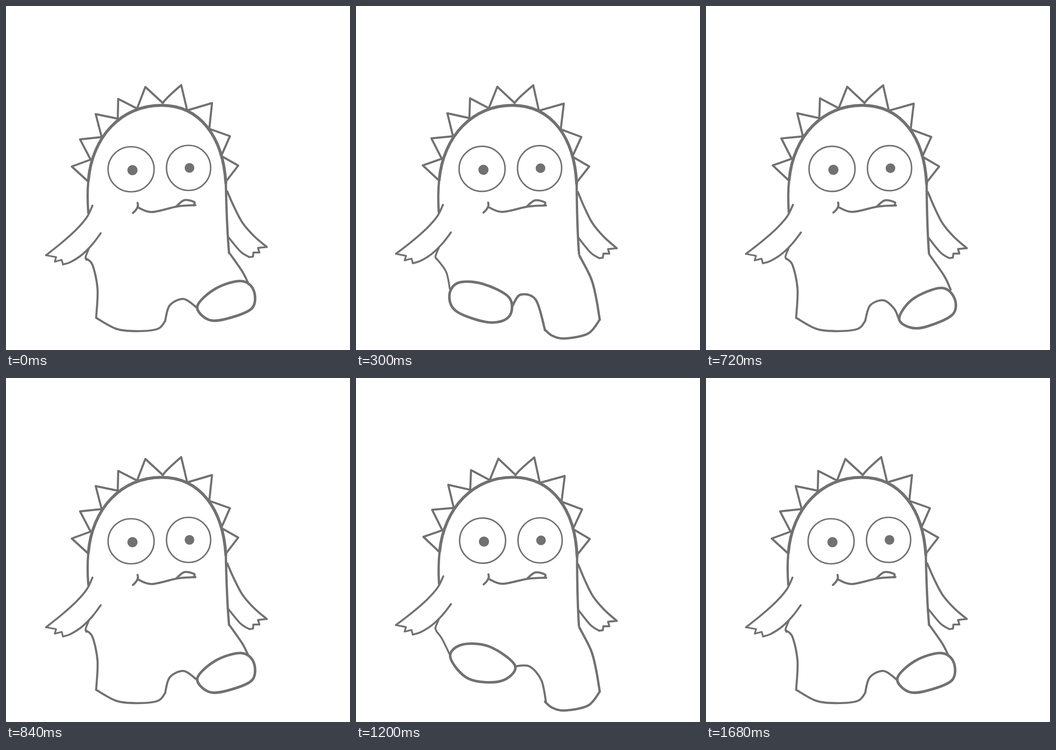
Animation, 748 px wide and 748 px high, one loop 1.8 s. Source, as an HTML page with a canvas:

```html
<!DOCTYPE html>
<html lang="en">
<head>
<meta charset="utf-8">
<title>Walking monster</title>
<style>
  html, body { margin: 0; width: 100%; height: 100%; overflow: hidden; background: #fff; }
  canvas { display: block; width: 748px; height: 748px; }
</style>
</head>
<body>
<canvas id="stage" width="748" height="748"></canvas>
<script>
const ctx = document.getElementById('stage').getContext('2d');
const SIZE = 748, INK = '#717171';
const LOOP = 1800, TICK = 60;
const TILT = 0.0187, PIVOT = [345, 530];
const THIN = 3.2, MID = 4.5, BOLD = 5.6;

const clamp = (v, lo, hi) => Math.max(lo, Math.min(hi, v));
const stroke = (d, width = MID) => ({ path: new Path2D(d), width });

// Catmull-Rom spline through a few key points
function curve(text, width = MID, closed = false) {
  const p = text.trim().split(/\s+/).map(s => s.split(',').map(Number));
  const n = p.length;
  const at = i => p[closed ? (i + n) % n : clamp(i, 0, n - 1)];
  let d = `M${p[0]}`;
  for (let i = 0; i < n - (closed ? 0 : 1); i++) {
    const [a, b, c, e] = [-1, 0, 1, 2].map(k => at(i + k));
    d += 'C' + [b.map((v, j) => v + (c[j] - a[j]) / 6),
                c.map((v, j) => v - (e[j] - b[j]) / 6), c];
  }
  return stroke(d + (closed ? 'Z' : ''), width);
}

const foot = text => curve(text, BOLD, true);

function oval(x, y, rx, ry = rx) {
  const path = new Path2D();
  path.ellipse(x, y, rx, ry, 0, 0, Math.PI * 2);
  return { path, width: THIN };
}

const spikes = stroke(`M178,381L143,349 184,334 161,290 208,285 195,235 243,245
  244,202 285,223 303,176 341,211Q347,201 381,172L394,227 448,211 442,267
  487,283 468,326 505,347 478,382`);

const body = [
  stroke('M179,450Q176,412 179,380M478,385Q480,480 485,537', 5),
  stroke('M179,380C187,285 250,216 338,216C422,216 472,285 478,385', 6.4)
];

const arms = [
  curve('188,434 176,459 153,486 122,514 87,542', 4.2),
  stroke('M87,542L109,546 106,556 121,552 124,562', 3.8),
  curve('124,562 140,557 165,541 188,518 206,494', 4.2),
  curve('180,528 173,546 175,552', 4),
  curve('481,403 496,437 514,471 539,500 567,524'),
  stroke('M567,524L548,526 551,536 538,536 537,545 529,546', 4.2),
  curve('529,546 510,534 484,503', 4.2)
];

const face = [
  oval(272, 355, 50, 49),
  oval(397, 352, 48, 49),
  stroke('M286,428Q290,438 276,450'),
  curve('287,438 317,448 372,436 412,433'),
  curve('371,435 388,422 409,426 408,433')
];

const pupils = [oval(275, 357, 11), oval(399, 352, 10.5)];
const upper = [spikes, ...body, ...arms, ...face];

const leftStand = [
  curve('174,549 188,563 199,615 196,678'),
  curve('196,678 240,702 285,707 330,702 346,685'),
];
const rightStand = [
  curve('486,543 511,592 522,634 530,682', 5),
  curve('411,704 427,717 455,723 505,712 530,682', 5)
];

// leg drawings, from right foot raised to left foot raised
const legs = [
  [
    ...leftStand,
    curve('346,685 356,651 386,637 415,656'),
    foot('416,653 455,615 510,598 538,617 535,657 480,680 440,682'),
    curve('485,536 513,576 526,601')
  ],
  [
    ...leftStand,
    curve('346,685 357,651 386,640 409,658 419,680'),
    foot('420,679 450,637 511,613 540,635 536,671 480,697 444,699'),
    curve('486,541 518,587 532,617')
  ],
  [
    curve('174,550 196,581 201,645 206,675'),
    foot('207,676 245,666 320,677 347,689 300,705 240,699'),
    curve('343,679 354,645 389,636 407,668'),
    foot('407,673 450,655 518,651 536,678 500,708 452,718 415,702'),
    curve('486,541 517,587 528,614 535,660', 5)
  ],
  [
    curve('175,549 196,578 204,615', 4),
    foot('203,630 222,602 275,604 333,634 333,675 290,688 220,665'),
    curve('339,655 357,628 391,639 411,705', 5),
    ...rightStand
  ],
  [
    curve('175,551 187,567 205,604', 4),
    foot('205,607 230,580 290,584 346,626 315,659 245,654'),
    curve('346,627 377,627 403,657 413,704'),
    ...rightStand
  ]
];

const smooth = p => (1 - Math.cos(Math.PI * p)) / 2;
const late = p => p ** 2.4;
const ramp = (tick, start, length, ease) => ease(clamp((tick - start) / length, 0, 1));

// two strides, each out and back; the first one leans more slowly
const legAt = t => [2, -9, 16, -24].reduce(
  (sum, s) => sum + Math.sign(s) * clamp(t - Math.abs(s), 0, 4), 0);
const leanAt = t =>
  ramp(t, 2, 5, smooth) - ramp(t, 8, 6, late) +
  ramp(t, 16, 4, smooth) - ramp(t, 24, 4, smooth);

function ink(strokes) {
  for (const { path, width } of strokes) {
    ctx.lineWidth = width;
    ctx.stroke(path);
  }
}

function draw(now) {
  const tick = Math.floor((now % LOOP) / TICK);
  ctx.fillStyle = '#fff';
  ctx.fillRect(0, 0, SIZE, SIZE);
  ctx.strokeStyle = ctx.fillStyle = INK;
  ctx.lineCap = ctx.lineJoin = 'round';

  ink(legs[legAt(tick)]);
  ctx.save();
  ctx.translate(...PIVOT);
  ctx.rotate(leanAt(tick) * TILT);
  ctx.translate(-PIVOT[0], -PIVOT[1]);
  ink(upper);
  pupils.forEach(p => ctx.fill(p.path));
  ctx.restore();
}

function run(now) {
  draw(now);
  requestAnimationFrame(run);
}
draw(0);
requestAnimationFrame(run);
</script>
</body>
</html>
```
